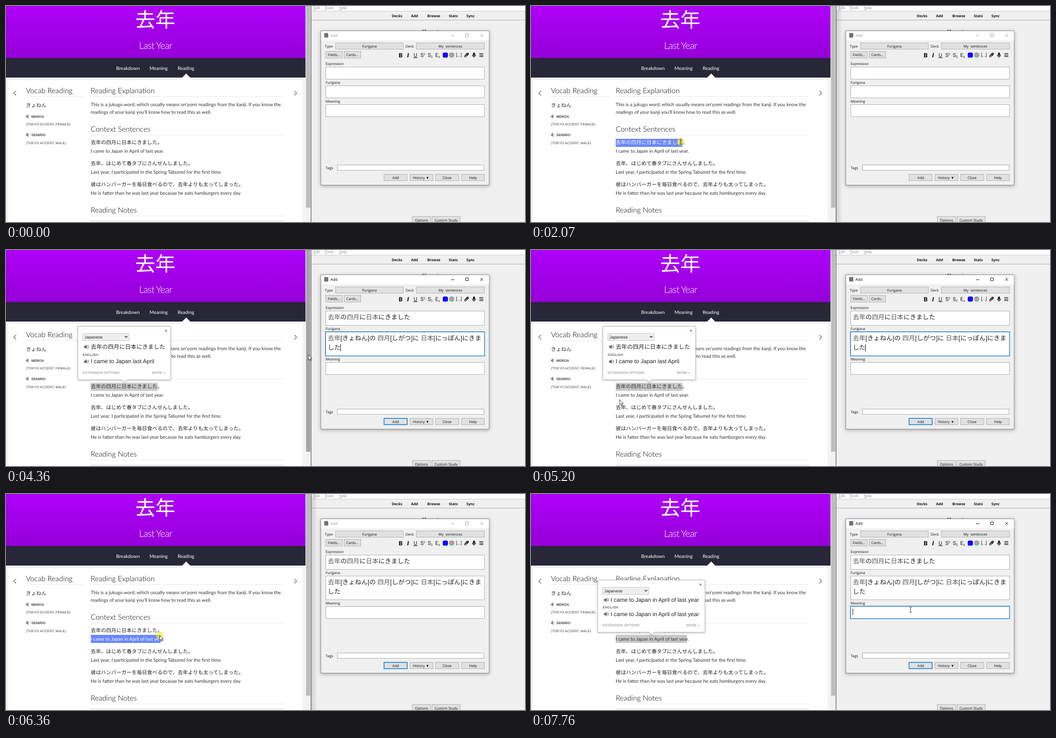
An HTML page for the animation above (8000 ms loop, 1158x483 px).

```html
<!DOCTYPE html>
<html lang="ja">
<head>
<meta charset="utf-8">
<title>Flashcard from a sentence</title>
<style>
html, body { margin: 0; width: 100%; height: 100%; overflow: hidden; background: #f0f0f0 }
svg { display: block }
text { white-space: pre; text-rendering: geometricPrecision }

/* web page */
.page { font: 400 10.65px Lato, "Noto Sans CJK JP", sans-serif; fill: #333 }
.head { font-size: 16.4px; font-weight: 300; fill: #000 }
.jp { font: 400 11.45px "Noto Sans CJK JP", sans-serif }
.voice { font: 7.7px "Liberation Sans", Arial, sans-serif; fill: #444 }
.voice .name { font-weight: 700 }
.rule { stroke: #e6e6e6 }

/* desktop app */
.app { font: 8px "Open Sans", "Noto Sans", sans-serif; fill: #111 }
.mid { text-anchor: middle }
.end { text-anchor: end }
.bold { font-weight: 700 }
.btn { fill: #e1e1e1; stroke: #adadad }
.box { fill: #fff; stroke: #a9a9a9 }
.focus { fill: none; stroke: #2f86cf; stroke-width: 1.6 }
.field { font: 14.15px "Liberation Sans", "Noto Sans CJK JP", sans-serif; fill: #222 }
.field tspan { font-weight: 300; fill: #555 }
.caret { fill: #000 }
.tool { font: 12px Roboto, sans-serif; text-anchor: middle; fill: #1a1a1a }

/* translation bubble */
.pop { font: 12.7px "Liberation Sans", "Noto Sans CJK JP", sans-serif; fill: #222 }
.small { font-size: 7.8px; font-weight: 700; fill: #aaa }
.shade { filter: drop-shadow(0 1px 2px rgba(0,0,0,.3)) }

/* one loop is 8 s, so 1% = 80 ms */
.sw { animation: 8s step-end infinite }
.mv { animation: 8s linear infinite }

.title { color: #999; animation-name: title }
@keyframes title { 35.6% { color: #000 } 69.1% { color: #999 } 95.75% { color: #000 } }
.front { opacity: 0; animation-name: front }
@keyframes front { 15.4% { opacity: 1 } 35.6% { opacity: 0 } 69.1% { opacity: 1 } 95.75% { opacity: 0 } }
.thumb { fill: #bdbdbd; animation-name: thumb }
@keyframes thumb { 54% { fill: #a5a5a5 } 56% { fill: #bdbdbd } }

.main-btn { animation-name: mainBtn }
@keyframes mainBtn {
  35.6% { stroke: #0078d7; stroke-width: 1.6px }
  89.4% { stroke: #0078d7; stroke-width: 1.6px; fill: #e5f1fb }
  92%, 100% { stroke: #0078d7; stroke-width: 1.6px; fill: #e1e1e1 }
}

.exp-box { animation-name: expBox }
@keyframes expBox { 39.6%, 100% { height: 32px } }
.exp-focus { opacity: 0; animation-name: expFocus }
@keyframes expFocus {
  35.6% { opacity: 1; height: 28px }
  39.6% { opacity: 1; height: 33px }
  45.6% { opacity: 0 }
}
.exp-caret { opacity: 0; animation-name: expCaret }
@keyframes expCaret {
  35.6% { opacity: 1; transform: translateX(0) }
  39.6% { opacity: 1; transform: translateX(185px) }
  45.6% { opacity: 0 }
}
.exp-text { opacity: 0; animation-name: expText }
@keyframes expText { 39.6% { opacity: 1 } }

.furi { animation-name: furi }
@keyframes furi { 39.6% { transform: translateY(5px) } }
.furi-box { animation-name: furiBox }
@keyframes furiBox { 51.87% { height: 53px } }
.furi-focus { opacity: 0; animation-name: furiFocus }
@keyframes furiFocus {
  45.6% { opacity: 1; height: 28px }
  51.87% { opacity: 1; height: 54px }
  69.1% { opacity: 0 }
}
.furi-caret { opacity: 0; animation-name: furiCaret }
@keyframes furiCaret {
  45.6% { opacity: 1; transform: none }
  51.87% { opacity: 1; transform: translate(28px, 22px) }
  58.1% { opacity: 0 }
  64.75% { opacity: 1; transform: translate(28px, 22px) }
  69.1% { opacity: 0 }
}
.furi-text { opacity: 0; animation-name: furiText }
@keyframes furiText { 51.87% { opacity: 1 } }

.mean { animation-name: mean }
@keyframes mean { 39.6% { transform: translateY(5px) } 51.87% { transform: translateY(31px) } }
.mean-focus { opacity: 0; animation-name: meanFocus }
@keyframes meanFocus { 95.75% { opacity: 1 } }

.drag1 { width: 0; animation-name: drag1 }
@keyframes drag1 {
  0%, 15.4% { width: 0 }
  25.25%, 69.12% { width: 149px }
  69.13%, 100% { width: 0 }
}
.drag2 { width: 0; animation-name: drag2 }
@keyframes drag2 {
  0%, 69.12% { width: 0 }
  71.5% { width: 10px }
  78.9%, 95.74% { width: 156px }
  95.75%, 100% { width: 159px }
}
.mark { fill: #6a86ff }
.ink { fill: #fff }
.mark1 { animation-name: mark1 }
.ink1 { animation-name: ink1 }
.mark2 { animation-name: mark2 }
.ink2 { animation-name: ink2 }
@keyframes mark1 { 35.6% { fill: #c8c8c8 } }
@keyframes ink1 { 35.6% { fill: #333 } }
@keyframes mark2 { 95.75% { fill: #c8c8c8 } }
@keyframes ink2 { 95.75% { fill: #333 } }

.pop1 { opacity: 0; animation-name: pop1 }
@keyframes pop1 {
  0%, 28.1% { opacity: 0 }
  30.6%, 69.1% { opacity: 1 }
  72.5%, 100% { opacity: 0 }
}
.pop2 { opacity: 0; animation-name: pop2 }
@keyframes pop2 { 0%, 85.2% { opacity: 0 } 87.6%, 100% { opacity: 1 } }

.mouse { animation: mouse 8s ease-in-out infinite }
@keyframes mouse {
  0%, 2% { transform: translate(995px, 461px) }
  11.87% { transform: translate(194px, 305px) }
  15.4% { transform: translate(194px, 305px); animation-timing-function: linear }
  25.25%, 28.1% { transform: translate(334px, 304px) }
  35%, 41.5% { transform: translate(759px, 146px) }
  45%  { transform: translate(755px, 203px) }
  51.87% { transform: translate(755px, 203px); animation-timing-function: ease-in }
  54.5% { transform: translate(676px, 234px); animation-timing-function: ease-out }
  61.5% { transform: translate(205px, 332px) }
  63.5% { transform: translate(200px, 342px) }
  67.25%, 69.1% { transform: translate(193px, 320px) }
  71.5% { transform: translate(199px, 320px); animation-timing-function: linear }
  78.9%, 85.2% { transform: translate(343px, 316px) }
  90.6% { transform: translate(852px, 378px) }
  94.5%, 100% { transform: translate(847px, 259px) }
}
.arrow { opacity: 0; animation-name: arrow }
@keyframes arrow {
  2% { opacity: 1 } 11.3% { opacity: 0 }
  28.7% { opacity: 1 } 34.8% { opacity: 0 }
  52.3% { opacity: 1 } 66.3% { opacity: 0 }
  77.5% { opacity: 1 } 93.8% { opacity: 0 }
}
.beam { opacity: 0; animation-name: beam }
@keyframes beam {
  11.3% { opacity: 1 } 28.7% { opacity: 0 }
  34.8% { opacity: 1 } 52.3% { opacity: 0 }
  66.3% { opacity: 1 } 77.5% { opacity: 0 }
  93.8% { opacity: 1 }
}
.press { opacity: 0; animation-name: press }
@keyframes press {
  15.4% { opacity: .65 } 28.1% { opacity: 0 }
  35% { opacity: .65 } 36.7% { opacity: 0 }
  45% { opacity: .65 } 46.8% { opacity: 0 }
  69.1% { opacity: .65 } 80.1% { opacity: .5 } 81.2% { opacity: .25 } 82.4% { opacity: 0 }
  95.75% { opacity: .65 } 97% { opacity: 0 }
}
</style>
</head>
<body>
<svg width="1158" height="483" viewBox="0 0 1158 483">
<defs>
  <linearGradient id="purple" x2="0" y2="1"><stop stop-color="#ae00f9"/><stop offset="1" stop-color="#9500d8"/></linearGradient>
  <linearGradient id="edge"><stop stop-opacity=".14"/><stop offset="1" stop-opacity="0"/></linearGradient>
  <linearGradient id="stripes" x2="0" y2="1">
    <stop offset=".33" stop-color="#6fa8dc"/><stop offset=".33" stop-color="#ee8d72"/>
    <stop offset=".62" stop-color="#ee8d72"/><stop offset=".62" stop-color="#7fb7a0"/>
  </linearGradient>
  <clipPath id="clip1"><rect class="mv drag1" x="189" y="297" height="18"/></clipPath>
  <clipPath id="clip2"><rect class="mv drag2" x="189" y="315" height="18"/></clipPath>
  <path id="horn" d="M0-2h2l3.5-3v10L2 2H0z" fill="#888"/>
  <g id="speaker">
    <path d="M0-2h2.3L6-5V5L2.3 2H0z" fill="#666"/>
    <path d="M7.3-2.4q1.7 2.4 0 4.8M8.4-4.6q3.6 4.6 0 9.2" fill="none" stroke="#666"/>
  </g>
  <g id="select">
    <rect x="11.5" y="16.5" width="103" height="16" fill="#efefef" stroke="#c4c4c4"/>
    <text x="15" y="27.8" font-size="9.4">Japanese</text>
    <path d="M105 22.5l3 3 3-3" fill="none" stroke="#222" stroke-width="1.4"/>
  </g>
  <path id="cross" d="M-2-2L2 2M2-2L-2 2" stroke="#777" stroke-width="1.2"/>
</defs>

<!-- web page -->
<g class="page">
  <rect width="669" height="483" fill="#f4f4f4"/>
  <rect width="668.5" height="117" fill="url(#purple)"/>
  <rect y="115.5" width="668.5" height="1" fill="#8400c0"/>
  <rect y="116.5" width="668.5" height="43.500" fill="#272738"/>
  <rect x="5" y="165.5" width="656.5" height="320" fill="#fff"/>
  <path d="M402 151l15 15h-30z" fill="#fff"/>
  <g fill="#fff" class="mid">
    <text x="333" y="46.5" style="font:300 45px 'Noto Sans CJK JP',sans-serif">去年</text>
    <text x="333.5" y="96" style="font-size:21.5px;font-weight:300;letter-spacing:-1px">Last Year</text>
    <text x="272" y="142.5">Breakdown</text>
    <text x="340.5" y="142.5">Meaning</text>
    <text x="401.5" y="142.5">Reading</text>
  </g>
  <g fill="none" stroke="#999" stroke-width="2.2">
    <path d="M22.5 190l-5 5 5 5"/><path d="M643.5 190l5 5-5 5"/>
  </g>
  <path class="rule" d="M45 202.5h130M189 202.5h431M189 288.5h431M189 469.5h431"/>
  <rect x="189" y="479" width="431" height="4" fill="#f0f0f0"/>

  <g class="head">
    <text x="44.5" y="195">Vocab Reading</text>
    <text x="189" y="195">Reading Explanation</text>
    <text x="189" y="281">Context Sentences</text>
    <text x="189" y="462">Reading Notes</text>
  </g>
  <text class="jp" x="44.5" y="226.3" style="font-weight:300">きょねん</text>
  <use href="#horn" x="44.5" y="247"/>
  <use href="#horn" x="44.5" y="288"/>
  <g class="voice">
    <text class="name" x="56.5" y="250">MEROA</text>
    <text x="44.5" y="267.3">(TOKYO ACCENT, FEMALE)</text>
    <text class="name" x="56.5" y="291.3">SENIRIO</text>
    <text x="44.5" y="308.5">(TOKYO ACCENT, MALE)</text>
  </g>
  <text x="189" y="224">This is a jukugo word, which usually means on'yomi readings from the kanji. If you know the</text>
  <text x="189" y="241">readings of your kanji you'll know how to read this as well.</text>
  <g class="jp" fill="#222">
    <text x="189" y="309.3">去年の四月に日本にきました。</text>
    <text x="189" y="356.3">去年、はじめて春タブにさんせんしました。</text>
    <text x="189" y="403.3">彼はハンバーガーを毎日食べるので、去年よりも太ってしまった。</text>
  </g>
  <text x="189" y="328">I came to Japan in April of last year.</text>
  <text x="189" y="375">Last year, I participated in the Spring Tabumel for the first time.</text>
  <text x="189" y="422">He is fatter than he was last year because he eats hamburgers every day.</text>

  <g clip-path="url(#clip1)">
    <rect class="sw mark mark1" x="189" y="297" width="149" height="18"/>
    <text class="jp sw ink ink1" x="189" y="309.3">去年の四月に日本にきました。</text>
  </g>
  <g clip-path="url(#clip2)">
    <rect class="sw mark mark2" x="189" y="315" width="160" height="18"/>
    <text class="sw ink ink2" x="189" y="328">I came to Japan in April of last year.</text>
  </g>
  <rect x="668.5" width="11.5" height="483" fill="#f1f1f1"/>
  <rect class="sw thumb" x="669.5" width="9.5" height="451"/>
</g>

<!-- main app window -->
<g class="app">
  <rect x="681" width="477" height="483" fill="#f0f0f0"/>
  <rect x="681" width="477" height="11" fill="#fdfdfd"/>
  <path d="M681 11.5h477" stroke="#c8c8c8"/>
  <path d="M681 31.5h477" stroke="#aaa"/>
  <g fill="#8a8a8a">
    <text x="686.5" y="7"><tspan text-decoration="underline">E</tspan>dit</text>
    <text x="711.5" y="7"><tspan text-decoration="underline">T</tspan>ools</text>
    <text x="743" y="7"><tspan text-decoration="underline">H</tspan>elp</text>
  </g>
  <g class="mid bold">
    <text x="872.5" y="25">Decks</text>
    <text x="911.5" y="25">Add</text>
    <text x="954.5" y="25">Browse</text>
    <text x="998" y="25">Stats</text>
    <text x="1036.5" y="25">Sync</text>
    <text x="960.5" y="59.5" font-size="9.4">My sentences</text>
  </g>
  <rect class="btn" x="906.5" y="470.5" width="41" height="16"/>
  <rect class="btn" x="950.5" y="470.5" width="63" height="16"/>
  <text class="mid" x="927" y="481.5">Options</text>
  <text class="mid" x="982" y="481.5">Custom Study</text>
  <rect x="680" width="1.2" height="483" fill="#4a4a4a"/>
  <rect class="sw front" x="681" width="14" height="483" fill="url(#edge)"/>
</g>

<!-- add dialog -->
<g class="app">
  <rect x="702.5" y="55.5" width="375.5" height="345" fill="#f0f0f0" stroke="#858585" style="filter:drop-shadow(0 2px 4px rgba(0,0,0,.3))"/>
  <rect x="703" y="56" width="374.5" height="21" fill="#fff"/>
  <rect x="710" y="60.5" width="9" height="10" fill="#6b727a"/>
  <g class="sw title">
    <text x="724" y="69" font-size="8.5" fill="currentColor">Add</text>
    <path d="M993 66.5h7M1025.5 62.5h6v6h-6zM1058 62.5l6.5 6.5M1064.5 62.5l-6.5 6.5" fill="none" stroke="currentColor"/>
  </g>

  <text x="711.5" y="92.8">Type</text>
  <text x="891.5" y="92.8">Deck</text>
  <g class="btn">
    <rect x="735.5" y="82.5" width="151" height="14"/>
    <rect x="915.5" y="82.5" width="152" height="14"/>
    <rect x="713.5" y="101.5" width="37" height="15"/>
    <rect x="754.5" y="101.5" width="37" height="15"/>
    <rect x="901.5" y="376.5" width="51" height="14"/>
    <rect x="958.5" y="376.5" width="52" height="14"/>
    <rect x="1016.5" y="376.5" width="51" height="14"/>
  </g>
  <rect class="btn sw main-btn" x="843.5" y="376.5" width="51.5" height="14"/>
  <g class="mid">
    <text x="811" y="92.6">Furigana</text>
    <text x="991.5" y="92.6">My  sentences</text>
    <text x="732" y="112">Fields...</text>
    <text x="773" y="112">Cards...</text>
    <text x="869.5" y="386.5">Add</text>
    <text x="926" y="386.5">History ▼</text>
    <text x="984" y="386.5">Close</text>
    <text x="1042" y="386.5">Help</text>
  </g>

  <g class="tool">
    <text x="880.5" y="114.5" style="font-weight:900;font-size:13.5px">B</text>
    <text x="897" y="114.5" style="font-weight:900;font-style:italic;font-size:13.5px">I</text>
    <text x="913.5" y="113.5">U</text>
    <text x="930" y="114">S<tspan dy="-4" font-size="6.5">2</tspan></text>
    <text x="946.5" y="114">S<tspan dy="2" font-size="6.5">2</tspan></text>
    <text x="963" y="114">E<tspan dy="2" font-size="7">x</tspan></text>
    <text x="1010.5" y="113" font-size="10">[...]</text>
    <rect x="974.5" y="104" width="11.5" height="11.5" rx="3.5" fill="#1400ff"/>
    <circle cx="994.5" cy="109.7" r="6" fill="url(#stripes)"/>
    <g fill="none" stroke="#1a1a1a" stroke-width="1.3">
      <path d="M909 115.5h9"/>
      <path d="M1056 106.5h9M1056 109.8h9M1056 113h9"/>
      <path d="M1025 111.5l4-4.5q1.5-1 2 .5l-5 6.2q-2.5 1.5-3.3-1.2l5-6.4q3.5-2.5 4.5 1.2l-3 4" stroke-width="1.2"/>
      <path d="M1040.5 109q0 4 3.7 4t3.7-4M1044.2 113v2.5"/>
    </g>
    <rect x="1042" y="104" width="4.4" height="7.5" rx="2.2"/>
  </g>

  <text x="713" y="132">Expression</text>
  <rect class="box sw exp-box" x="713.5" y="136.5" width="354" height="27"/>
  <rect class="focus sw exp-focus" x="712.8" y="135.8" width="355" height="28"/>
  <text class="field sw exp-text" x="718" y="155"><tspan>去年</tspan>の<tspan>四月</tspan>に<tspan>日本</tspan>にきました</text>
  <rect class="caret sw exp-caret" x="718" y="142" width="1" height="16"/>

  <g class="sw furi">
    <text x="713" y="174">Furigana</text>
    <rect class="box sw furi-box" x="713.5" y="178.5" width="354" height="27"/>
    <rect class="focus sw furi-focus" x="712.8" y="177.8" width="355" height="28"/>
    <g class="field sw furi-text">
      <text x="718" y="197"><tspan>去年</tspan>[きょねん]の <tspan>四月</tspan>[しがつ]に <tspan>日本</tspan>[にっぽん]にきま</text>
      <text x="718" y="218">した</text>
    </g>
    <rect class="caret sw furi-caret" x="718" y="183.5" width="1" height="16"/>
  </g>

  <g class="sw mean">
    <text x="713" y="216">Meaning</text>
    <rect class="box" x="713.5" y="220.5" width="354" height="27"/>
    <g class="sw mean-focus">
      <rect class="focus" x="712.8" y="219.8" width="355" height="28"/>
      <rect class="caret" x="717.5" y="225" width="1" height="15"/>
    </g>
  </g>

  <text x="713.5" y="365">Tags</text>
  <rect class="box" x="739.5" y="355.5" width="327" height="12"/>
</g>

<!-- translation bubbles -->
<g transform="translate(160 170)"><g class="pop mv pop1">
  <path class="shade" d="M.5.5h206.5v119.5H110l-6 5.5-6-5.5H.5z" fill="#fff" stroke="#bdbdbd"/>
  <use href="#select"/>
  <use href="#cross" x="197" y="10.5"/>
  <use href="#speaker" x="14" y="46.5"/>
  <text x="29" y="50.8" font-size="12.77">去年の四月に日本にきました</text>
  <text class="small" x="11" y="67" style="fill:#777">ENGLISH</text>
  <use href="#speaker" x="14" y="79.5"/>
  <text x="29" y="83.3">I came to Japan last April</text>
  <text class="small" x="11" y="106.6">EXTENSION OPTIONS</text>
  <text class="small end" x="195.5" y="106.6">MORE »</text>
</g></g>
<g transform="translate(148.5 192)"><g class="pop mv pop2">
  <path class="shade" d="M.5.5h239v116.5H126.5l-6 5.5-6-5.5H.5z" fill="#fff" stroke="#bdbdbd"/>
  <use href="#select"/>
  <use href="#cross" x="229.5" y="10.5"/>
  <use href="#speaker" x="14" y="45"/>
  <text x="29" y="48.8">I came to Japan in April of last year</text>
  <text class="small" x="11.5" y="64" style="fill:#777">ENGLISH</text>
  <use href="#speaker" x="14" y="76.5"/>
  <text x="29" y="80.6">I came to Japan in April of last year</text>
  <text class="small" x="11.5" y="103.8">EXTENSION OPTIONS</text>
  <text class="small end" x="228" y="103.8">MORE »</text>
</g></g>

<!-- mouse -->
<g class="mouse">
  <circle class="sw press" r="8.5" fill="#ffec2e"/>
  <path class="sw arrow" d="M0 0v11.5l2.6-2.3 1.8 4 2-.9-1.8-3.9h3.5z" fill="#fff" stroke="#111" stroke-width=".9"/>
  <path class="sw beam" d="M-2.5-5.5h2l.5.5.5-.5h2M0-5V5M-2.5 5.5h2l.5-.5.5.5h2" fill="none" stroke="#222"/>
</g>
</svg>
</body>
</html>
```
